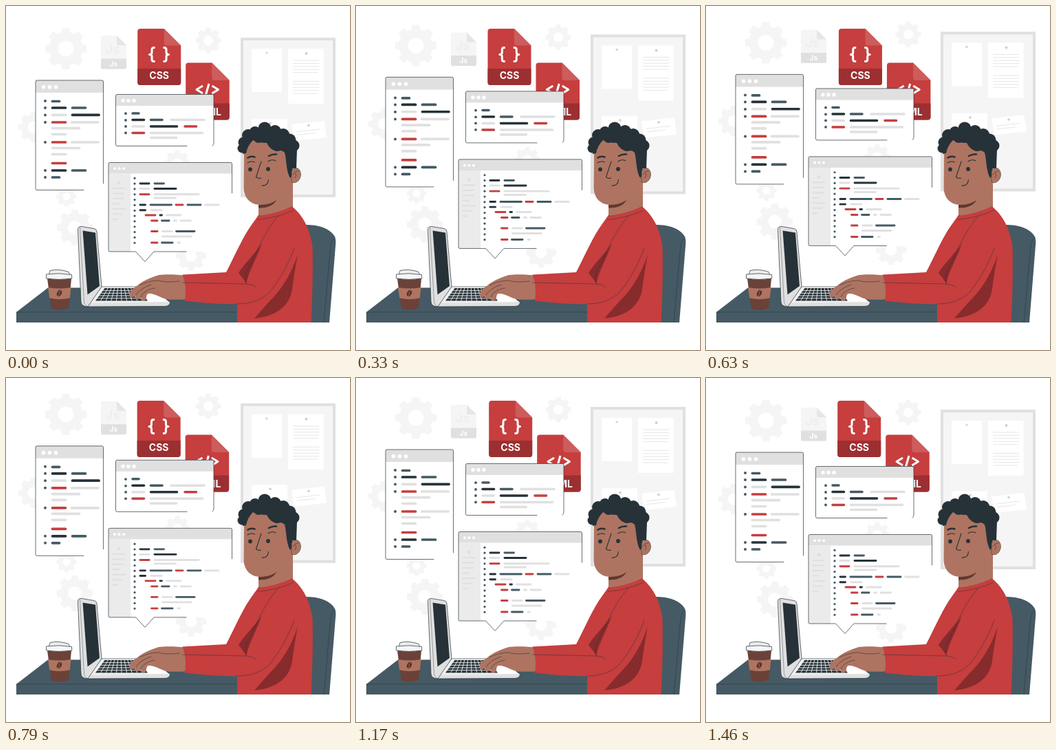
Write an HTML page that moves like this. It is 500 by 500 pixels and loops after 1.5 s.

```html
<!DOCTYPE html>
<html lang="en">
<head>
<meta charset="utf-8">
<title>Programmer at work</title>
<style>
html, body { margin: 0; width: 100%; height: 100%; overflow: hidden; background: #fff; }
svg { display: block; width: 100%; height: 100%; }
text { font-family: Inter, "Open Sans", sans-serif; font-weight: 700; text-anchor: middle; }
.ink { fill: none; stroke: #263238; stroke-linecap: round; stroke-linejoin: round; }
.edge { stroke: #263238; stroke-linejoin: round; }
.bar { fill: none; stroke-linecap: round; }
.icon { fill: none; stroke: #fff; stroke-width: 3; stroke-linejoin: round; }
</style>
</head>
<body>
<svg viewBox="0 0 500 500" xmlns="http://www.w3.org/2000/svg" stroke-width=".7">
  <g class="float" id="back"></g>
  <g id="files"></g>
  <g class="float" id="windows"></g>

  <g id="chair">
    <path fill="#455a64" d="M436 318C453 318 466 322 474 330C479 335 480 340 479 348L470 460H430V330Z"/>
    <path class="ink" stroke-width=".5" d="M478.500 336C473 340 472 347 471 357L462 460"/>
  </g>

  <g id="desk">
    <path fill="#455a64" d="M15 445L61 409.500H345V460H15Z"/>
    <path class="ink" stroke-width=".5" d="M15 445H337"/>
  </g>

  <g id="cup">
    <path fill="#6b4138" d="M60 396L95 396L91 439Q78 444 66 440Z"/>
    <path fill="#ae7461" d="M61 409Q78 412 94.500 409L92.800 424.500Q78 428 63.300 424.500Z"/>
    <g transform="rotate(28 77.500 417.500)">
      <ellipse cx="77.500" cy="417.500" rx="3.300" ry="4.800" fill="#55312a"/>
      <path d="M77.500 413Q75.500 417 77.500 418T77.500 422" fill="none" stroke="#ae7461" stroke-width=".8"/>
    </g>
    <path class="edge" fill="#ebebeb" d="M62 391L64 384.500Q77 381.500 91 386.500L93 391Z"/>
    <path class="edge" fill="#f5f5f5" d="M58.500 390Q77 387.500 95.500 390.500L95.800 396Q77 399 58.500 396Z"/>
  </g>

  <g id="laptop">
    <path class="edge" fill="#e0e0e0" d="M117 436L139 408H190L238.500 430Q238.500 436 231 436.500L118 437Z"/>
    <path fill="#f0f0f0" d="M120 431.500L139 408.500H190L238 430.500Z"/>
    <path fill="#fff" d="M198 424L206 416Q222 415 236 429.500L206 430Z"/>
    <path fill="#263238" d="M130 428.500L143.500 410H191L206 428.500Z"/>
    <g id="keys" stroke="#f0f0f0" stroke-width=".9"></g>
    <path class="edge" fill="#e0e0e0" d="M104.500 326Q104 320 110 320.500L128 323.500Q131.500 324 132 328L139 408L119 437Q109.500 437 109 430Z"/>
    <path class="ink" d="M107.500 322L113.500 430Q114 435 119 437" stroke-width=".4"/>
    <path fill="#263238" d="M111.500 326.500L130 329.500L136 407L118.500 419.500Z"/>
  </g>

  <g id="man">
    <path fill="#ae7461" d="M266 392C246 390 233 389.500 222 391C210 395 199 399 190 407C182 412 178 417 180 421C182 425 187 423 189 420C186 427 191 429 196 423C196 428 199 430 203 427C205 424 203 420 207 418C216 417 225 425 236 426.500C244 427 252 427 266 426Z"/>
    <path class="ink" d="M189 420C193 413 202 408 211 405M196 423C198 417 207 411 216 410M194 406C202 402 212 399 222 399C231 402 243 401 252 400" stroke-width=".6"/>

    <path fill="#c63e3e" d="M256.500 390.500L320 387C334 360 345 334 357 318C362 311 365 307 367 303.500L416 291.500C430 303 442 322 445.500 350C446.500 390 445 430 443.500 460H336V433C310 434 285 431 260 428.500C262 415 261 402 256.500 390.500Z"/>
    <path fill="#872b2d" d="M372 345C361 361 344 377 338 388L349.500 403C353 385 364 368 372 345Z"/>
    <path fill="#872b2d" d="M424 361C414 392 398 415 384 428L361 454C395 451 413 434 416 411C418 394 421 378 424 361Z"/>
    <path class="ink" stroke-width=".5" d="M256.500 402L349.500 404C356 405 361 406 363 409M397 304C377 325 366 354 351 384C347 391 347 398 349.500 404M336 433C360 433 377 425 388 410C403 389 412 371 419 352"/>

    <path fill="#ae7461" d="M367 268L417 238V293Q394 306 367 304Z"/>
    <path fill="#c63e3e" d="M366 305Q394 302 416 291L418 297Q394 308 366 311Z"/>
    <path class="ink" d="M366 310.500Q394 308 418 297" stroke-width=".5"/>
    <path fill="#62382f" d="M367 287C378 288 388 284 395 278C391 290 380 294 367 293.500Z"/>
    <path fill="#ae7461" d="M346 192L345.500 264C346 281 357 289 370 289C391 289 407 275 415 250L416 192Z"/>
    <g fill="#263238">
      <path d="M344 205C348 185 366 178 384 180C406 182 423 190 423 208L422 236H417C415 240 416 249 413 250C407 240 408 224 405 213Q400 208 395 211Q384 210 379 199Q366 199 359 195Q351 203 349 214L344 215Z"/>
      <g id="curls"></g>
    </g>
    <path class="edge" stroke-width=".5" fill="#ae7461" d="M415 240C419 233 428 234 428.500 245C428 254 421 259 415 256Z"/>
    <path class="ink" stroke-width=".6" d="M417 245Q421 239 425 240M421 243Q423 247 420 250"/>
    <path class="ink" stroke-width="2.600" d="M351.500 220.500Q356 217.500 361.500 219.500M382 218Q387 215 393 215.500"/>
    <path class="ink" stroke-width="1.100" d="M351 228Q356 224.500 361.500 227M381 226Q386 222 392 225M371 226L363.500 248.500Q367 251.500 370.500 250M372 261C378 262 381 258 381.500 252.500"/>
    <circle cx="355" cy="237.500" r="2.900" fill="#263238"/>
    <circle cx="381" cy="237" r="2.900" fill="#263238"/>
  </g>
</svg>
<script>
const RED = '#c63e3e', DARK = '#263238', SLATE = '#455a64', GREY = '#e0e0e0', PALE = '#f5f5f5';
const put = (id, html) => { document.getElementById(id).innerHTML += html; };
const rect = (x, y, w, h, fill, r = 0) =>
  `<rect x="${x}" y="${y}" width="${w}" height="${h}" rx="${r}" fill="${fill}"/>`;
const dot = (x, y, r, fill) => `<circle cx="${x}" cy="${y}" r="${r}" fill="${fill}"/>`;
const path = (d, fill, more = '') => `<path d="${d}" fill="${fill}" ${more}/>`;
const bar = (x1, x2, y, color, w) =>
  `<path class="bar" d="M${x1} ${y}H${x2}" stroke="${color}" stroke-width="${w}"/>`;
const label = (s, x, y, size, fill) =>
  `<text x="${x}" y="${y}" font-size="${size}" fill="${fill}">${s}</text>`;
const ink = d => `<path class="ink" d="${d}"/>`;

function gear(x, y, r) {
  const at = (a, k) => `${(x + r * k * Math.cos(a)).toFixed(2)} ${(y + r * k * Math.sin(a)).toFixed(2)}`;
  const pts = [];
  for (let i = 0; i < 8; i++) {
    const a = i * Math.PI / 4;
    pts.push(at(a - .25, .82), at(a - .17, 1.02), at(a + .17, 1.02), at(a + .25, .82));
  }
  const h = r * .38;
  const hole = `M${x - h} ${y}a${h} ${h} 0 1 0 ${2 * h} 0a${h} ${h} 0 1 0 ${-2 * h} 0Z`;
  return path('M' + pts.join('L') + 'Z' + hole, PALE, 'fill-rule="evenodd"');
}

// Document icon with a folded corner and a label band
function sheet(x, y, w, h, fold, band, r, fills) {
  const R = x + w, B = y + h;
  return path(`M${x + r} ${y}H${R - fold}L${R} ${y + fold}V${B - r}Q${R} ${B} ${R - r} ${B}H${x + r}Q${x} ${B} ${x} ${B - r}V${y + r}Q${x} ${y} ${x + r} ${y}Z`, fills[0]) +
    path(`M${x} ${B - band}H${R}V${B - r}Q${R} ${B} ${R - r} ${B}H${x + r}Q${x} ${B} ${x} ${B - r}Z`, fills[1]) +
    path(`M${R - fold} ${y}L${R} ${y + fold}H${R - fold + r}Q${R - fold} ${y + fold} ${R - fold} ${y + fold - r}Z`, fills[2]);
}

const rows = (list, w) => list.map(([y, ...cells]) => {
  let s = '';
  for (let i = 0; i < cells.length; i += 3) s += bar(cells[i + 1], cells[i + 2], y, cells[i], w);
  return s;
}).join('');
const bullets = (x, ys, r) => ys.map(y => dot(x, y, r, SLATE)).join('');

function pane(x, y, w, h, head, buttons, r) {
  return rect(x, y, w, h, '#fff', 2) +
    path(`M${x} ${y + head}V${y + 2}q0 -2 2 -2H${x + w - 2}q2 0 2 2V${y + head}Z`, GREY) +
    buttons.map(b => dot(b, y + head / 2 + .8, r, '#fff')).join('');
}

// Gears, notice board, pale document
let back = [[87, 62, 30], [294, 50, 18.5], [40, 176, 22], [88, 277, 14.5], [100, 322, 26], [249, 228, 18.5], [269, 363, 22]]
  .map(g => gear(...g)).join('');
back += rect(341, 46, 138, 232, GREY) + rect(345, 50, 130, 224, PALE) +
  rect(357, 62, 44, 63, '#fff') + rect(410, 62, 51.5, 80, '#fff') + rect(357, 164.5, 52, 63, '#fff') +
  path('M415 172L462.500 167L466 191L419 196Z', '#fff') +
  dot(379, 68, 1.6, '#d0d0d0') + dot(436.5, 69, 2, '#d0d0d0') + dot(384, 170.5, 1.8, '#d0d0d0') + dot(440, 173.5, 1.8, '#d0d0d0');
for (const top of [79, 109.5])
  for (let i = 0; i < 5; i++) back += bar(417.5, i === 4 ? 453 : 455, top + i * 4.4, GREY, .8);
back += path('M422 183L456 179M423 187.500L450 184.500', 'none', 'stroke="#e0e0e0" stroke-width=".8"');
back += sheet(138, 43, 37, 48.5, 14, 15, 2.5, [PALE, GREY, '#e6e6e6']) +
  label('Js', 155, 69, 18, '#eee') + label('Js', 156.3, 87.6, 10, '#fff');
put('back', back);

// Red documents
const reds = [RED, '#9c2f31', '#cd5c5c'];
put('files',
  sheet(191.2, 33, 63, 82, 24.5, 24, 4, reds) +
  '<path class="icon" d="M216.500 60.500H215Q212 60.500 212 63.500V67.500Q212 70.500 208.500 70.500Q212 70.500 212 73.500V77.500Q212 80.500 215 80.500H216.500M228.500 60.500H230Q233 60.500 233 63.500V67.500Q233 70.500 236.500 70.500Q233 70.500 233 73.500V77.500Q233 80.500 230 80.500H228.500"/>' +
  label('CSS', 222.7, 106.2, 14, '#fff') +
  sheet(261.2, 82.5, 63.5, 83, 25.5, 24, 4, reds) +
  '<path class="icon" d="M286 116L277 121.500L286 127M295 113L290 130.500M299.500 116L308.500 121.500L299.500 127"/>' +
  label('HTML', 292.5, 158.5, 14, '#fff'));

// Code windows
const tall = pane(43, 108, 98.5, 159.5, 18, [54.5, 63.5, 72.5], 2.8) +
  bullets(57, [138, 148, 158.5, 169, 198, 239, 249], 2) +
  rows([
    [138.5, SLATE, 67.5, 77.5],
    [148, DARK, 67.5, 86.5, SLATE, 96.5, 115.5],
    [158.3, GREY, 67.5, 86.5, DARK, 96.5, 135],
    [169, RED, 67.5, 86.5, GREY, 95.5, 134],
    [177.7, GREY, 67.5, 106.5],
    [186.5, GREY, 67.5, 86.5],
    [198, RED, 67.5, 86.5, GREY, 95.5, 134],
    [206.5, GREY, 67.5, 106.5],
    [215.5, GREY, 67.5, 86.5],
    [228.5, RED, 67.5, 86.5],
    [239, DARK, 67.5, 86.5, SLATE, 96.5, 115.5],
    [249, SLATE, 67.5, 77.5]
  ], 3.7) +
  ink('M113 267.500H45Q43 267.500 43 265.500V110Q43 108 45 108H139.500Q141.500 108 141.500 110V258');

const wide = pane(159.5, 128.5, 142.5, 75, 16.5, [170, 178, 186], 2.7) +
  bullets(174, [156.2, 166, 175, 184.5], 1.9) +
  rows([
    [156, SLATE, 184, 193],
    [165.5, DARK, 184, 200.5, SLATE, 210.5, 227, GREY, 240, 288],
    [175, GREY, 184, 200.5, DARK, 210.5, 248.5, RED, 260, 276.5],
    [184.5, RED, 184, 200.5, GREY, 210.5, 285.5],
    [191.5, GREY, 210.5, 247.5]
  ], 3.5) +
  ink('M263 203.500H161.500Q159.500 203.500 159.500 201.500V130.500Q159.500 128.500 161.500 128.500H300Q302 128.500 302 130.500V199Q302 202 300 203.200');

let bubble = path('M188 356L202 371.500L215 356Z', '#fff') +
  pane(149, 227.5, 179.5, 129.5, 16, [158, 164.5, 171], 2) +
  path('M149 243.500H181V357H151Q149 357 149 355Z', '#ebebeb') +
  dot(164, 257, 2.5, GREY) +
  [17, 16, 16, 9, 18, 14, 7].map((w, i) => bar(155.5, 155 + w, 265 + i * 7.5, GREY, 2.2)).join('');
for (let i = 0; i < 13; i++) bubble += dot(187, 250.3 + i * 7.83, 1.6, SLATE);
bubble += rows([
  [258, DARK, 195, 208, SLATE, 216, 229.5],
  [265.5, GREY, 195, 208, DARK, 216, 247],
  [273.7, RED, 195, 208, GREY, 216, 280],
  [279, GREY, 216, 246.5],
  [289, DARK, 195, 202.5, SLATE, 210, 240.5, RED, 247, 257, SLATE, 264, 283, GREY, 289.5, 309],
  [296.7, DARK, 195, 202.5, GREY, 211, 226],
  [304, RED, 203, 217, DARK, 224, 226.5, GREY, 233.5, 254],
  [312, RED, 211.5, 220, SLATE, 226.5, 237, GREY, 244.5, 247.5, GREY, 254, 268.5],
  [327.5, RED, 211.5, 220, GREY, 227.5, 241, SLATE, 247.5, 274],
  [335, GREY, 227.5, 269],
  [344, RED, 211.5, 220, SLATE, 226.5, 242, GREY, 250, 252.5]
], 2.9) +
  ink('M262 357H215L202 371.500L188.500 357H151Q149 357 149 355V229.500Q149 227.500 151 227.500H326.500Q328.500 227.500 328.500 229.500V272');
put('windows', tall + wide + bubble);

// Keyboard gaps
let keys = '';
for (let i = 1; i < 5; i++) keys += `<path d="M${143 - i * 3} ${410 + i * 3.7}H${192 + i * 3}"/>`;
for (let i = 1; i < 10; i++) keys += `<path d="M${143.5 + i * 4.75} 410L${130 + i * 7.6} 428.500"/>`;
put('keys', keys);

put('curls', [[343, 207, 6.5], [345, 198, 7.5], [352, 188, 9], [362, 183, 8], [376, 178, 9.5], [391, 182, 9],
  [403, 187, 9], [412, 195, 9.5], [418, 203, 8.5], [394, 203, 8], [367, 192, 7]]
  .map(c => dot(...c, DARK)).join(''));

// Motion: a linear bob for most things and a sideways shake for the red documents
const LOOP = 1500, STEP = 1000 / 24, LAST = 35;
const SHAKE = [0, -1, 2, -4, 4, -4, 4, -4, 2, -1, 0];
const floaters = document.querySelectorAll('.float');
const files = document.getElementById('files');

function draw(ms) {
  const u = Math.min(Math.floor((ms % LOOP + 5) / STEP), LAST) / LAST;
  const lift = -10 * (1 - Math.abs(1 - 2 * u));
  const i = Math.min(Math.floor(u * 10 + 1e-9), 9);
  const shift = SHAKE[i] + (SHAKE[i + 1] - SHAKE[i]) * (u * 10 - i);
  floaters.forEach(g => g.setAttribute('transform', `translate(0 ${lift.toFixed(3)})`));
  files.setAttribute('transform', `translate(${shift.toFixed(3)} 0)`);
}

let start;
function tick(now) {
  start ??= now;
  draw(now - start);
  requestAnimationFrame(tick);
}
draw(0);
requestAnimationFrame(tick);
</script>
</body>
</html>
```
